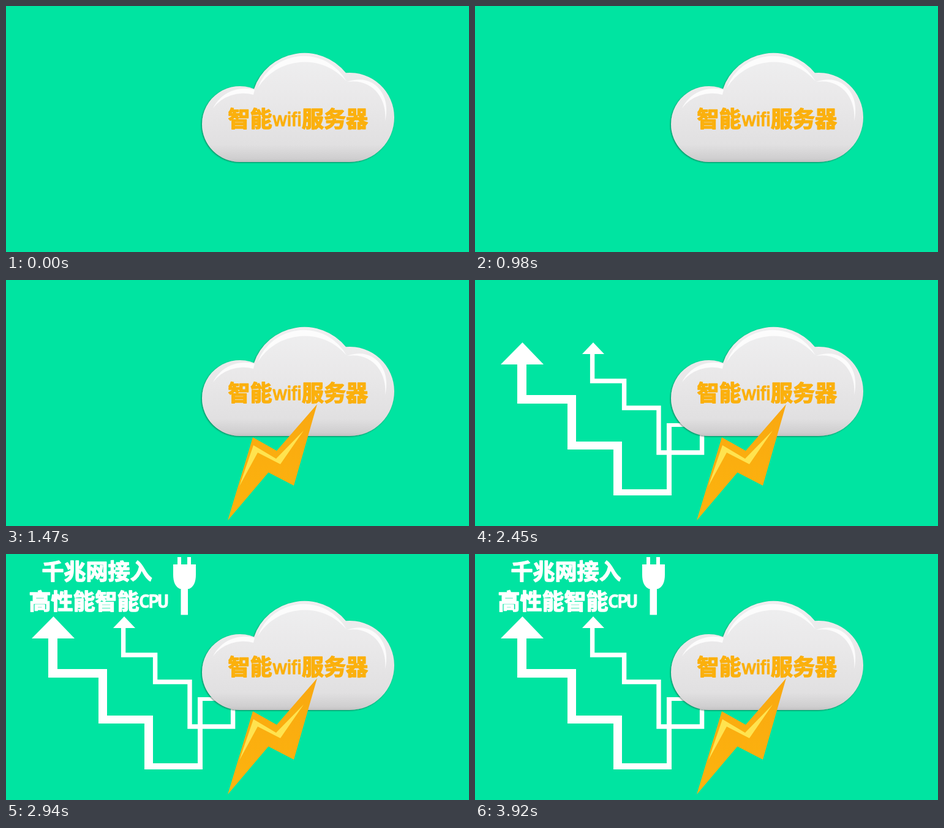
These frames come from a looping animation (756x402 px, 4.41 s). An HTML page:

```html
<!DOCTYPE html>
<html lang="zh">
<head>
<meta charset="utf-8">
<title>智能wifi服务器</title>
<style>
  html, body { margin: 0; width: 100%; height: 100%; overflow: hidden; background: #00e4a1; }
  svg { display: block; width: 756px; height: 402px; }
  text {
    font: 700 36px "Noto Sans CJK SC", "Noto Sans CJK JP", "Noto Sans CJK", sans-serif;
    stroke-width: 1.5; stroke-linejoin: round;
  }
  .latin {
    font: 400 31px "Liberation Sans", Arial, sans-serif;
    font-variant-ligatures: none; letter-spacing: .5px;
  }
  .caps { font: 600 30px "Noto Sans Mono", monospace; letter-spacing: -2.8px; stroke-width: .4; }
  .white { fill: #fff; stroke: #fff; }
  .gold { fill: #fbb00d; stroke: #fbb00d; }
</style>
</head>
<body>
<svg viewBox="0 0 756 402">
  <defs>
    <linearGradient id="body" x1="0" y1="77" x2="0" y2="255" gradientUnits="userSpaceOnUse">
      <stop offset="0" stop-color="#efeff0"/>
      <stop offset=".45" stop-color="#e9e8e9"/>
      <stop offset=".84" stop-color="#e1e0e1"/>
      <stop offset=".97" stop-color="#cfcecf"/>
      <stop offset="1" stop-color="#c2c1c2"/>
    </linearGradient>
    <linearGradient id="flash" x1="0" y1="203" x2="0" y2="393" gradientUnits="userSpaceOnUse">
      <stop offset="0" stop-color="#f9a811"/>
      <stop offset="1" stop-color="#fdb40d"/>
    </linearGradient>
    <filter id="shade" x="-10%" y="-10%" width="120%" height="120%">
      <feDropShadow dx="-1" dy="1" stdDeviation="1.3" flood-color="#00442f" flood-opacity=".6"/>
    </filter>
  </defs>

  <path id="thin" fill="none" stroke="#fff" stroke-width="7.4"
    d="M191.6 118V165H243.6V209H300V282H370.6V240"/>
  <path id="thinHead" fill="#fff" d="M193 102L211 121H175Z"/>
  <path id="wide" fill="#fff"
    d="M42 138L77.5 102L112 138H84V188H165V264H240V342H313V234H350V240H321V352H226V277H151V202H69V138Z"/>

  <g id="cloud">
    <path fill="url(#body)" filter="url(#shade)"
      d="M382 255A62 62 0 0 1 320 193A62 62 0 0 1 405 135.400A87 87 0 0 1 555 109.300A73 73 0 0 1 634 182A73 73 0 0 1 561 255Z"/>
    <g fill="#fff" fill-opacity=".85">
      <path d="M411 134A80 80 0 0 1 556 123A90 90 0 0 0 411 134Z"/>
      <path d="M338 167A58 57 0 0 1 406 137L404 145A61 59 0 0 0 338 167Z"/>
      <path d="M557 124C600 108 630 145 619 188C623 150 597 118 557 124Z"/>
    </g>
    <g class="gold">
      <text x="362.5" y="198">智能</text>
      <text class="latin" x="436" y="196">wifi</text>
      <text x="483" y="198">服务器</text>
    </g>
  </g>

  <g id="bolt">
    <path fill="url(#flash)" d="M508 203L470 336L428.500 314.500L362 393L403 257L442 279Z"/>
    <path fill="#ffe34f" d="M486 246L448 301L411 282L381 337L404 270L441 292Z"/>
  </g>

  <g id="label" class="white">
    <text x="58.500" y="41.500">千兆网接入</text>
    <text x="37.500" y="91">高性能智能</text>
    <text class="caps" x="217" y="88">CPU</text>
    <path stroke="none"
      d="M280 5H286V17H296V5H302V17H310V34Q310 52 299 57H297V99.500H285.500V57H284Q273 52 273 34V17H280Z"/>
  </g>
</svg>
<script>
  const STEP = 490, LOOP = 4410;

  // Steps during which each part is on show
  const parts = {
    bolt: [1, 3, 4, 5, 6, 7, 8],
    thin: [4, 5, 6, 7, 8],
    thinHead: [4, 5, 6, 7, 8],
    wide: [5, 6, 7, 8],
    label: [6, 8]
  };

  function draw(ms) {
    const step = Math.floor((ms % LOOP) / STEP);
    for (const id in parts) {
      const shown = parts[id].includes(step);
      document.getElementById(id).style.visibility = shown ? 'visible' : 'hidden';
    }
  }

  const start = performance.now();
  function tick() {
    draw(performance.now() - start);
    requestAnimationFrame(tick);
  }
  tick();
</script>
</body>
</html>
```
